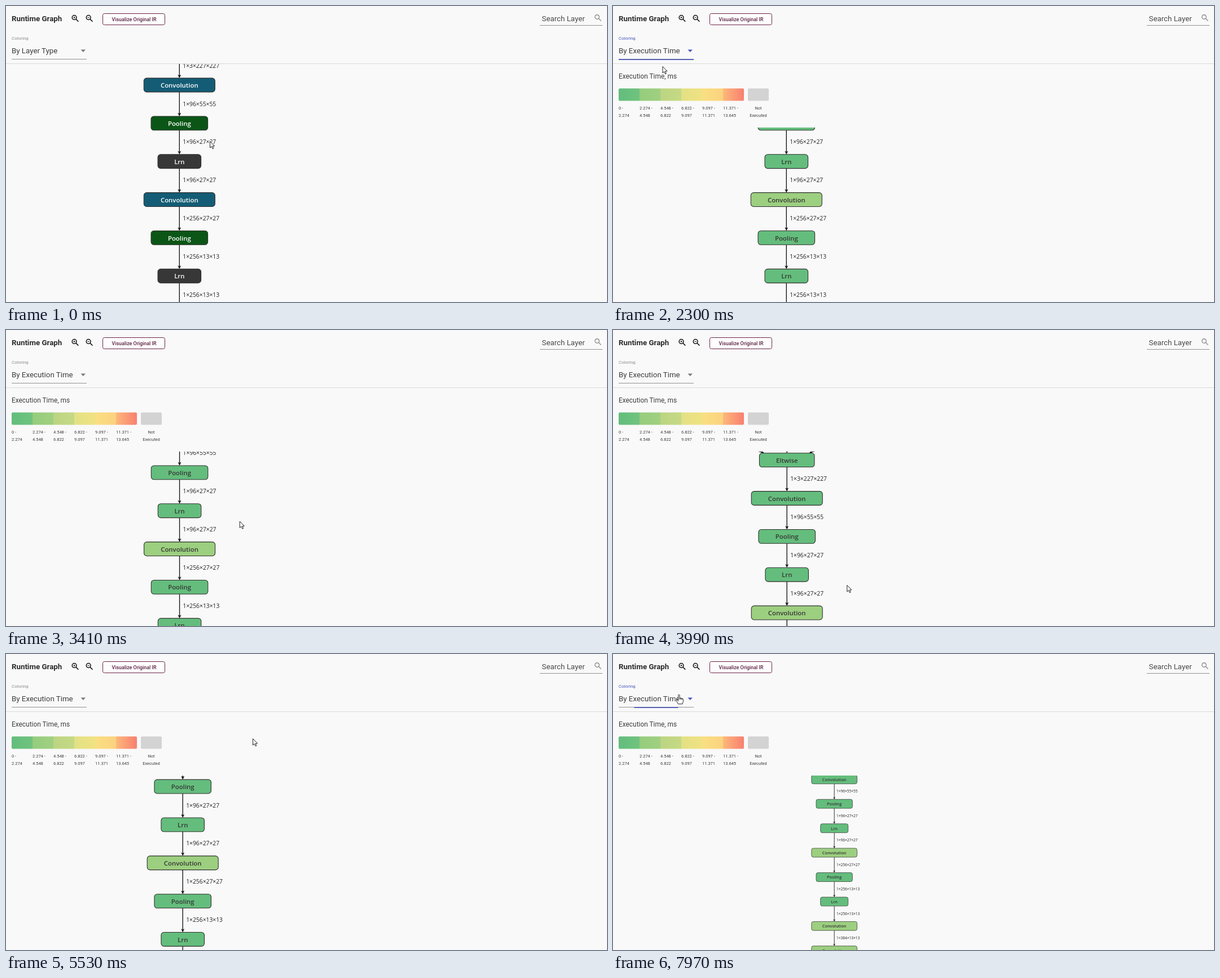
An HTML page that plays this animation: 1065x526 px, repeating every 8000 ms.

```html
<!DOCTYPE html>
<html lang="en">
<head>
<meta charset="utf-8">
<title>Runtime graph</title>
<style>
  html, body { margin: 0; width: 100%; height: 100%; overflow: hidden; background: #f9f9f9; }
  svg { display: block; width: 100%; height: 100%; font: 13.3px Roboto, sans-serif; fill: #3c3c3c; }
  .line { fill: none; stroke: #929292; }
  .icon { fill: none; stroke: #111; stroke-width: 2.2; }
  .small { font-size: 7.5px; }
  .item { font-size: 10.5px; }
  #caption { font-size: 8px; fill: #8c8c8c; }
  #arrow { fill: #777; }
  .focus #caption, .focus #arrow, .chosen { fill: #4657bd; }
  #bar { fill: #3f51b5; }
  #panel { filter: drop-shadow(0 2px 2px #0005); }

  #graph { font-family: "Open Sans", "Noto Sans", sans-serif; }
  .node rect { stroke: #303030; stroke-width: 1.1; }
  .node text { font-size: 11.4px; font-weight: 600; fill: #fff; }
  .shape { font-size: 10.3px; fill: #222; }
  .edge { fill: none; stroke: #111; stroke-width: 1.35; }
  .Convolution rect { fill: #145c75; }
  .Pooling rect { fill: #0b5616; }
  .Lrn rect, .Eltwise rect { fill: #373737; }
  .timed .cool rect { fill: #64bd7c; }
  .timed .warm rect { fill: #9ccf7f; }
  .node.off rect { fill: #d4d4d5; }
  .timed .node text, .node.off text { fill: #363636; }
  .node .link { font-weight: 400; text-decoration: underline; }
  #mouse path { fill: #fff; stroke: #222; stroke-width: 1; stroke-linejoin: round; }
</style>
</head>
<body>
<svg id="stage"></svg>
<script>
const PITCH = 67.85, HALF = 12.4;
const WIDTHS = { Convolution: 126, Pooling: 100.5, Lrn: 76.5, Eltwise: 97.5, Const: 91, data: 84 };
// name, heat, output shape
const LAYERS = [
  ['Eltwise', 'cool', '1×3×227×227'],
  ['Convolution', 'cool', '1×96×55×55'],
  ['Pooling', 'cool', '1×96×27×27'],
  ['Lrn', 'cool', '1×96×27×27'],
  ['Convolution', 'warm', '1×256×27×27'],
  ['Pooling', 'cool', '1×256×13×13'],
  ['Lrn', 'cool', '1×256×13×13'],
  ['Convolution', 'warm', '1×384×13×13'],
  ['Convolution', 'warm', '1×384×13×13'],
];
const HEAT = ['#63bd7c', '#70c37f', '#95cc7d', '#a0d080', '#bbd582', '#c6d985',
  '#e2e185', '#f0e283', '#f9df82', '#fcd27f', '#fcb87a', '#f97f70'];
const LIMITS = ['0', '2.274', '4.548', '6.822', '9.097', '11.371', '13.645'];

const text = (x, y, s, attrs = '') => `<text x="${x}" y="${y}" ${attrs}>${s}</text>`;
const rect = (x, y, w, h, attrs = '') =>
  `<rect x="${x}" y="${y}" width="${w}" height="${h}" ${attrs}/>`;
const middle = 'text-anchor="middle"';

function node(name, x, y, kind) {
  const w = WIDTHS[name];
  const label = name === 'data'
    ? text(x - 34.5, y + 4.6, 'data') + text(x - 1.5, y + 4.6, 'Details', 'class="link"')
    : text(x, y + 4.6, name, middle);
  return `<g class="node ${name} ${kind}">${rect(x - w / 2, y - HALF, w, HALF * 2, 'rx="5"')}${label}</g>`;
}
const tip = (x, y, turn = 0) =>
  `<path d="M0 0L-3-6.2 0-4.6 3-6.2Z" fill="#111" transform="translate(${x} ${y}) rotate(${turn})"/>`;
const shape = (x, y, s) => text(x + 6, y + 37, s, 'class="shape"');
function down(x, y, s) {
  const end = y + PITCH - HALF;
  return `<path class="edge" d="M${x} ${y + HALF}V${end - 3}"/>${tip(x, end)}${shape(x, y, s)}`;
}
function bend(x, end, y, s) {
  const side = Math.sign(x), to = y + PITCH - HALF;
  return `<path class="edge" d="M${x} ${y + HALF}C${x} ${y + 35} ${x - side * 26} ${y + 40} ${end + side * 3} ${to - 1}"/>` +
    tip(end, to, side * 73) + shape(x, y, s);
}
function graph() {
  const top = -2 * PITCH;
  return bend(-115.6, -40, top, '1×3×1×1') + down(0, top, '1×3×1×1') +
    bend(111.5, 39, top, '1×3×227×227') +
    LAYERS.map(([, , s], i) => down(0, (i - 1) * PITCH, s)).join('') +
    node('Const', -115.6, top, 'off') + node('Const', 0, top, 'off') + node('data', 111.5, top, 'off') +
    rect(62.9, top - 18.8, 97.3, 37.6, 'rx="2" fill="none" stroke="#1b3eb5" stroke-width="2"') +
    LAYERS.map(([name, heat], i) => node(name, 0, (i - 1) * PITCH, heat)).join('');
}
function lens(x, y, scale, sign, style = '') {
  return `<g class="icon" style="${style}" transform="translate(${x} ${y}) scale(${scale})">
    <circle cx="9.5" cy="9.5" r="5.5"/><path d="M13.6 13.6L19.8 19.8"/>
    <path d="${sign}" stroke-width="1.3"/></g>`;
}
function legend() {
  const stops = HEAT.map((c, i) =>
    `<stop offset="${Math.ceil(i / 2) / 6}" stop-color="${c}"/>`).join('');
  const labels = LIMITS.slice(0, 6).map((v, i) =>
    text(10 + 37 * i, 183.5, v + ' -') + text(10 + 37 * i, 196.6, LIMITS[i + 1])).join('');
  return `<linearGradient id="heat">${stops}</linearGradient>` +
    text(10, 128.8, 'Execution Time, ms', 'font-size="11.9"') +
    rect(10, 146.5, 222, 22, 'rx="2" fill="url(#heat)"') +
    rect(239, 146.5, 37, 22, 'rx="2" fill="#d3d3d4"') +
    `<g class="small">${labels}${text(257.5, 183.5, 'Not', middle)}${text(257.5, 196.6, 'Executed', middle)}</g>`;
}

const $ = id => document.getElementById(id);
$('stage').innerHTML = `
  <clipPath id="view"><rect id="window" width="1065" height="526"/></clipPath>
  <g clip-path="url(#view)"><g id="graph">${graph()}</g></g>
  ${text(10, 26.6, 'Runtime Graph', 'font-weight="700" fill="#2b2b2b"')}
  ${lens(114.4, 13.8, .7, 'M9.5 7V12M7 9.5H12')}
  ${lens(139.5, 13.8, .7, 'M7 9.5H12')}
  ${rect(171.5, 13.5, 110, 20, 'rx="3" fill="#fdfdfd" stroke="#6b2447"')}
  ${text(227, 27.1, 'Visualize Original IR', middle + ' font-size="8.85" font-weight="500" fill="#5c2140"')}
  ${text(949.5, 26.8, 'Search Layer', 'fill="#484848"')}
  ${lens(1041, 13, .68, '', 'stroke:#8a8a8a;stroke-width:2')}
  <path class="line" d="M946 34.5H1057M10 94.5H143"/>
  <path d="M0 102.5H1065" stroke="#d9d9d9"/>
  <g id="field">
    ${text(10, 60, 'Coloring', 'id="caption"')}
    ${text(10, 84.2, '', 'id="value"')}
    <path id="arrow" d="M132.5 77.5H141L136.75 82Z"/>
    <rect id="bar" y="94.3" height="1.6"/>
  </g>
  <g id="legend">${legend()}</g>
  <g id="panel" class="item">
    ${rect(-4, 64, 159.5, 93, 'rx="2" fill="#fff"')}
    ${rect(0, 64, 155.5, 31.3, 'fill="#e0e0e0"')}
    ${rect(0, 95.3, 155.5, 31, 'id="hover" fill="#f3f3f3"')}
    ${text(10, 82.8, 'By Layer Type', 'class="chosen"')}
    ${text(10, 113.9, 'By Execution Time')}
    ${text(10, 145, 'By Runtime Precision')}
  </g>
  <g id="mouse">
    <path id="pointer" d="M.5 .5V12L3.2 9.6 5.1 13.8 6.9 13 5 8.9H8.6Z"/>
    <path id="hand" d="M-1.3 9.8V1.4a1.2 1.2 0 0 1 2.4 0V6l5 1.2q1.4.4 1.3 2v3.2l-1.4 4.4H-1.6l-2.8-5.2q-.9-1.8.5-2.2 1.3-.1 2.6 2ZM1.1 6v3M3.3 6.6v2.6M5.4 7.1v2.2"/>
  </g>`;

// The screen refreshes in bursts: first time, last time, number of steps
const BURSTS = [[120, 1020, 8], [1170, 1460, 3], [2180, 3140, 8], [3260, 4290, 8], [4410, 4830, 4],
  [5140, 6170, 9], [6320, 6320, 1], [6600, 6600, 1], [6880, 7690, 7], [7970, 7970, 1]];
// time, x, y
const CURSOR = [[0, 361, 240], [630, 58.5, 85], [1020, 58.5, 85], [1460, 87.5, 107], [2180, 87.5, 107],
  [3000, 413.5, 294.5], [3140, 413.5, 294.5], [3900, 414.3, 453], [4000, 414.3, 453], [4290, 428, 281],
  [4830, 446, 398], [5010, 446, 398], [5520, 437, 150], [5530, 437, 150], [5910, 77, 60],
  [6170, 129.5, 26.5], [6320, 147.5, 22], [6880, 147.5, 22], [7690, 117, 72]];
const PAN = [[3140, 307.3, 140.5], [3900, 308.2, 299], [4290, 308.2, 299], [4830, 322.2, 416.2],
  [5010, 322.2, 416.2], [5520, 313.2, 167.7]];

function snap(t) {
  let shown = 0;
  for (const [from, to, n] of BURSTS) {
    if (t < from) break;
    const step = n > 1 ? (to - from) / (n - 1) : 1;
    shown = from + Math.min(n - 1, Math.floor((t - from + 8) / step)) * step;
  }
  return shown;
}
function along(keys, t) {
  const i = keys.findIndex(k => k[0] > t);
  if (i < 0) return keys[keys.length - 1].slice(1);
  if (i === 0) return keys[0].slice(1);
  const a = keys[i - 1], b = keys[i];
  const u = (t - a[0]) / (b[0] - a[0]), e = u * u * (3 - 2 * u);
  return [a[1] + (b[1] - a[1]) * e, a[2] + (b[2] - a[2]) * e];
}
const show = (id, on) => { $(id).style.display = on ? '' : 'none'; };

function draw(time) {
  const t = snap(time);
  const timed = t >= 2180, open = t > 880 && !timed;
  const focus = t > 760 && t < 3135 || t >= 7970;
  const [mx, my] = along(CURSOR, t);
  const [px, py] = along(PAN, t);
  const zoom = t < 6600 ? 1 : t < 6880 ? .8 : .64;
  const gx = 532.5 + (px - 532.5) * zoom, gy = 320.8 + (py - 320.8) * zoom;

  $('graph').setAttribute('transform', `translate(${gx} ${gy}) scale(${zoom})`);
  $('graph').setAttribute('class', timed ? 'timed' : '');
  $('window').setAttribute('y', timed ? 216 : 102);
  $('field').setAttribute('class', focus ? 'focus' : '');
  $('value').textContent = timed ? 'By Execution Time' : 'By Layer Type';
  const half = !focus ? 0 : t >= 7970 ? 39 : 66.5;
  $('bar').setAttribute('x', 76.5 - half);
  $('bar').setAttribute('width', half * 2);
  show('legend', timed);
  show('panel', open);
  show('hover', my > 95);

  const hand = mx < 155 && (my < 30 || my > 68 && my < 96 || open);
  show('hand', hand);
  show('pointer', !hand);
  $('mouse').setAttribute('transform', `translate(${mx} ${my})`);
}
function tick() {
  draw(performance.now() % 8000);
  requestAnimationFrame(tick);
}
tick();
</script>
</body>
</html>
```
